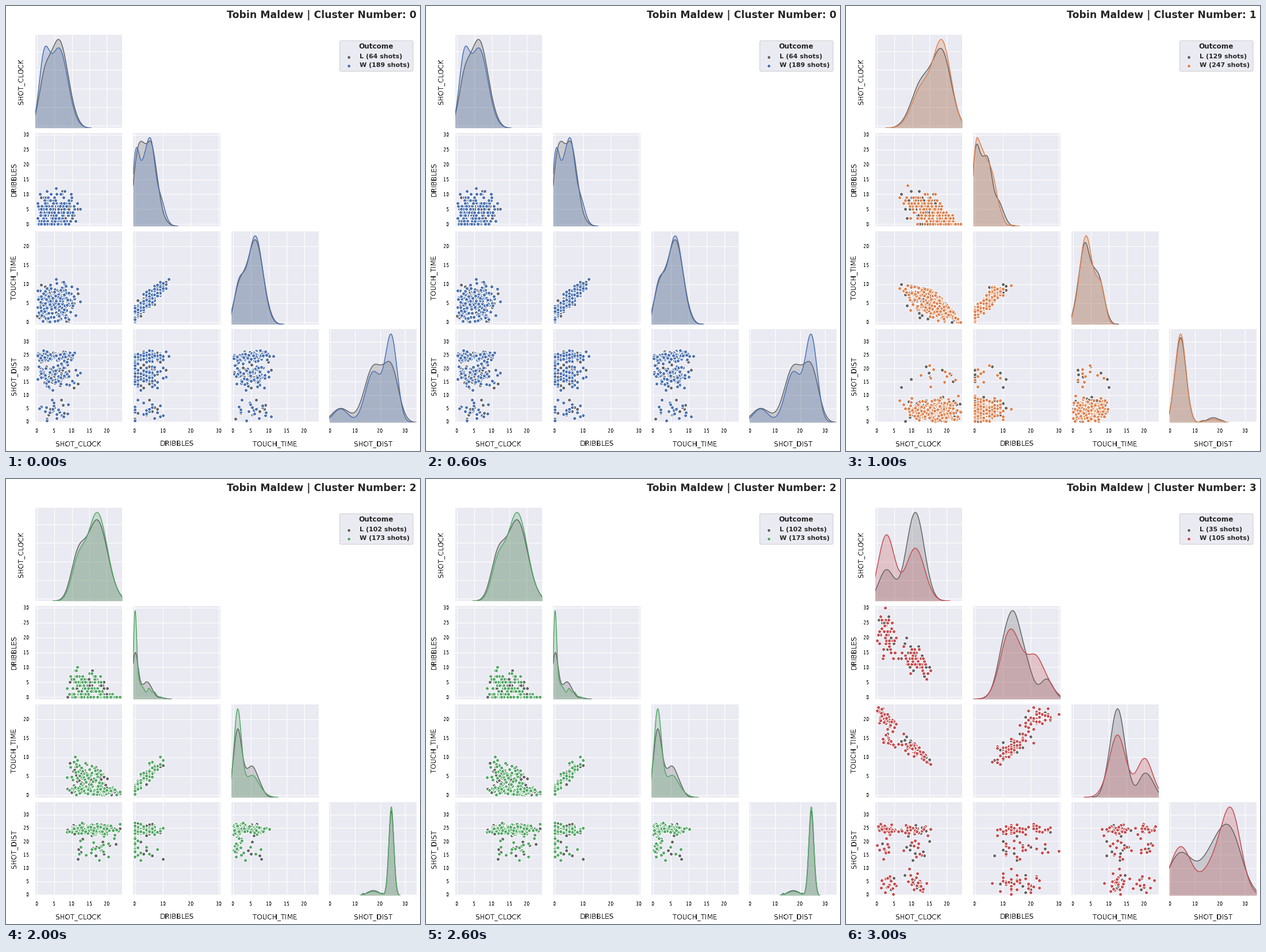
These frames come from a looping animation (720 by 774 pixels, 4000 ms). A matplotlib script:

```python
import numpy as np
import matplotlib.pyplot as plt
from matplotlib.animation import FuncAnimation
from matplotlib.patches import FancyBboxPatch

plt.rcParams["font.family"] = "DejaVu Sans"
# Axis labels are crisp; only the bold text is smoothed.
plt.rcParams["text.antialiased"] = False
BOLD = dict(weight="bold", antialiased=True)

WIDTH, HEIGHT = 720, 774
INK, PANEL, LOSS = "#262626", "#eaeaf2", "#646464"
PLAYER = "Tobin Maldew"

NAMES = ["SHOT_CLOCK", "DRIBBLES", "TOUCH_TIME", "SHOT_DIST"]
LIMITS = [(-.6, 24.5), (-.68, 30.6), (-.6, 24), (-.32, 34.6)]
X_STEPS, Y_STEP = [5, 10, 5, 10], 5
LEFT, TOP, PITCH_X, PITCH_Y = 50.5, 50, 170.6, 170.8
PANEL_W, PANEL_H = 151.8, 162

# Bells are (mean, spread). Distances come from the rim, mid-range and the arc.
ZONES = [(4.2, 2), (17.3, 2.3), (24.5, .9)]

# Each outcome holds the number of shots, the share of the first clock bell,
# the share of the first touch bell and the shares of the zones.
CLUSTERS = [
    dict(color="#4c72b0", pull=0,
         clock=[(2, 1), (6.3, 2.3)], touch=[(1.7, 1.1), (6.2, 1.9)],
         loss=(64, .2, .22, [.12, .5, .38]),
         win=(189, .3, .22, [.1, .4, .5])),
    dict(color="#dd8452", pull=-.4,
         clock=[(18.7, 2.2), (12.8, 2.5)], touch=[(3.5, 1.4), (7.4, 1.1)],
         loss=(129, .6, .62, [.94, .06, 0]),
         win=(247, .66, .68, [.96, .04, 0])),
    dict(color="#55a868", pull=-.3,
         clock=[(17.3, 2.6), (11.7, 1.4)], touch=[(1.2, .6), (5, 2.1)],
         loss=(102, .75, .5, [0, .12, .88]),
         win=(173, .8, .62, [0, .1, .9])),
    dict(color="#c44e52", pull=-.68,
         clock=[(2.7, 1.4), (11, 1.9)], touch=[(12.4, 1.5), (20.3, 1.6)],
         loss=(35, .23, .76, [.32, .3, .38]),
         win=(105, .52, .62, [.32, .2, .48])),
]


def bell(x, mean, spread):
    return np.exp(-((x - mean) / spread) ** 2 / 2) / spread


def spread_out(bells, shares, count, top=40):
    """Evenly spread quantiles of a mix of bells, folded back into 0..top."""
    grid = np.linspace(-10, top + 10, 3000)
    cdf = np.cumsum(sum(w * bell(grid, *b) for b, w in zip(bells, shares)))
    values = np.interp((np.arange(count) + .5) / count, cdf / cdf[-1], grid)
    return top - np.abs(top - np.abs(values))


def make_shots(cluster, outcome, seed):
    rng = np.random.default_rng(seed)
    count, clock_share, touch_share, zone_shares = cluster[outcome]
    pull = cluster["pull"]

    clock = rng.permutation(spread_out(
        cluster["clock"], (clock_share, 1 - clock_share), count, top=24))
    touch = spread_out(cluster["touch"], (touch_share, 1 - touch_share), count)
    order = (pull * (clock - clock.mean()) / clock.std()
             + (1 - abs(pull)) * rng.normal(size=count))
    touch = np.sort(touch)[order.argsort().argsort()]
    # A possession lasts 24 seconds, so a long touch leaves little clock.
    room = 24.6 - clock
    touch = np.where(touch > room, room - rng.uniform(0, 1.6, count), touch)
    touch = np.maximum(touch, 0)

    dribbles = 1.2 * touch - 2.2 + rng.normal(size=count) * (.6 + .1 * touch)
    dribbles = np.clip(np.round(dribbles), 0, 30)
    dist = rng.permutation(spread_out(ZONES, zone_shares, count))
    return clock, dribbles, touch, dist


def estimate_density(values, x):
    """Gaussian kernel density with a robust Scott bandwidth."""
    q1, q3 = np.percentile(values, [25, 75])
    width = 1.059 * min(values.std(), (q3 - q1) / 1.349) * len(values) ** -.2
    curve = bell(x[:, None], values, width).mean(axis=1)
    inside = (x > values.min() - 3 * width) & (x < values.max() + 3 * width)
    return np.where(inside, curve, np.nan)


def make_panel(row, col):
    x, y = LEFT + col * PITCH_X, TOP + row * PITCH_Y
    ax = fig.add_axes([x / WIDTH, 1 - (y + PANEL_H) / HEIGHT,
                       PANEL_W / WIDTH, PANEL_H / HEIGHT], facecolor=PANEL)
    ax.set(xlim=LIMITS[col], ylim=LIMITS[row],
           xticks=np.arange(0, LIMITS[col][1], X_STEPS[col]),
           yticks=np.arange(0, LIMITS[row][1], Y_STEP))
    ax.spines[:].set_visible(False)
    ax.set_axisbelow(True)
    ax.grid(color="white", lw=1)
    ax.tick_params(length=0, labelsize=8, labelcolor=INK,
                   labelbottom=row == 3, labelleft=col == 0 and row > 0)
    ax.tick_params(axis="x", pad=10.5)
    ax.tick_params(axis="y", pad=10)
    return ax


def put(x, y, text, size, **style):
    return stage.text(x, y, text, fontsize=size, color=INK, **style)


def dot(ax, x, y, color):
    return ax.scatter(x, y, s=36, color=color, edgecolors="white", linewidths=1)


def draw_curve(ax, x, height, color):
    place = ax.get_xaxis_transform()
    fill = ax.fill_between(x, 0, height, color=color, alpha=.25, lw=0,
                           transform=place)
    line, = ax.plot(x, height, color=color, lw=1.5, transform=place)
    return [fill, line]


def draw_cluster(index, cluster):
    artists = []
    colors = [LOSS, cluster["color"]]
    groups = [make_shots(cluster, outcome, 10 * index + j)
              for j, outcome in enumerate(("loss", "win"))]

    for (row, col), ax in panels.items():
        if row == col:
            x = np.linspace(*LIMITS[col], 400)
            curves = [estimate_density(shots[col], x) for shots in groups]
            scale = .95 / np.nanmax(curves)
            for curve, color in zip(curves, colors):
                artists += draw_curve(ax, x, curve * scale, color)
        else:
            for shots, color in zip(groups, colors):
                artists.append(dot(ax, shots[col], shots[row], color))

    for j, (shots, color) in enumerate(zip(groups, colors)):
        y = 88 + 15 * j
        artists.append(dot(stage, 595.5, y + .5, color))
        artists.append(put(614.7, y + 3.3, f"{'LW'[j]} ({len(shots[0])} shots)",
                           11, **BOLD))

    artists.append(put(713.6, 21, f"{PLAYER} | Cluster Number: {index}", 17.28,
                       ha="right", **BOLD))
    return artists


fig = plt.figure(figsize=(WIDTH / 72, HEIGHT / 72), dpi=72, facecolor="white")
panels = {(r, c): make_panel(r, c) for r in range(4) for c in range(r + 1)}

# A transparent layer in pixel coordinates for titles, labels and the legend.
stage = fig.add_axes([0, 0, 1, 1], xlim=(0, WIDTH), ylim=(HEIGHT, 0))
stage.axis("off")
stage.add_patch(FancyBboxPatch(
    (580.5, 60.5), 127.5, 53, boxstyle="round,pad=0,rounding_size=2.2",
    fc=PANEL, ec="#cccccc", lw=1))
put(644, 74, "Outcome", 12, ha="center", **BOLD)
for k, name in enumerate(NAMES):
    put(LEFT + k * PITCH_X + PANEL_W / 2, 765, name, 12, ha="center")
    put(29.5 if k == 0 else 17.5, TOP + k * PITCH_Y + PANEL_H / 2, name, 12,
        ha="center", va="baseline", rotation=90, rotation_mode="anchor")

scenes = [draw_cluster(i, cluster) for i, cluster in enumerate(CLUSTERS)]


def show(frame):
    for i, artists in enumerate(scenes):
        for artist in artists:
            artist.set_visible(i == frame)
    return scenes[frame]


anim = FuncAnimation(fig, show, frames=len(scenes), init_func=lambda: show(0),
                     interval=1000, repeat=True, repeat_delay=0)
plt.show()
```
